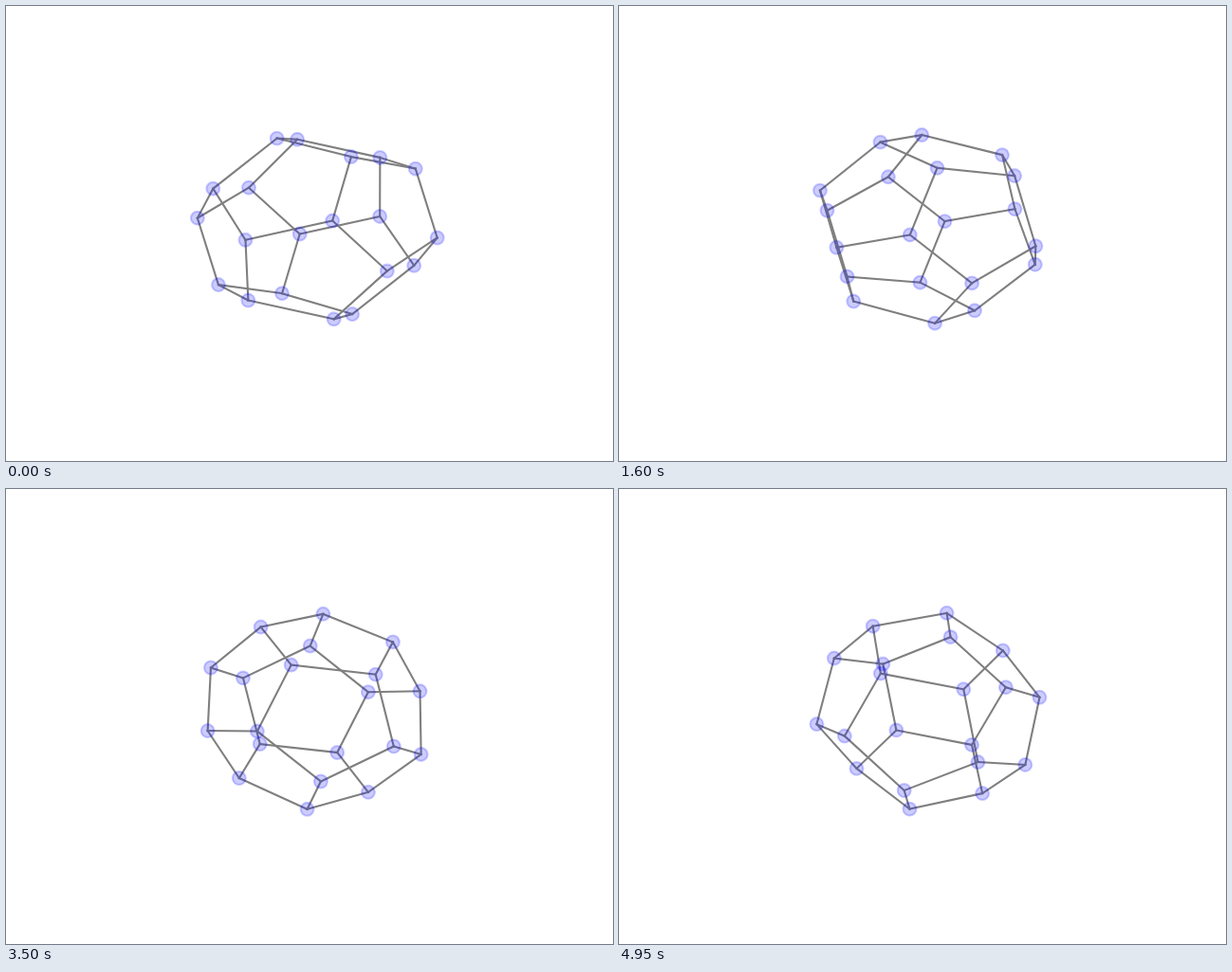
These frames come from a looping animation (640x480 px, 5000 ms). An HTML page with a canvas:

```html
<!DOCTYPE html>
<html lang="en">
<head>
<meta charset="utf-8">
<title>Rotating dodecahedron</title>
<style>
  html, body { margin: 0; width: 100%; height: 100%; overflow: hidden; background: #fff; }
  canvas { display: block; }
</style>
</head>
<body>
<canvas id="stage" width="640" height="480"></canvas>
<script>
const ctx = document.getElementById('stage').getContext('2d');
const STEP = 50, STEPS = 100;
const CENTER = [326.08, 233.92], EYE = 2432.4;
const PHI = (1 + Math.sqrt(5)) / 2;

// Maps the regular solid to the slightly sheared one in view space (pixels).
const SHAPE = [
  [26.09, -68.11, -0.05],
  [71.14, 16.55, -18.22],
  [15.70, 1.68, 57.92]
];

const dot = (a, b) => a[0] * b[0] + a[1] * b[1] + a[2] * b[2];

function dodecahedron() {
  const s = [-1, 1], v = [];
  for (const a of s) for (const b of s) {
    for (const c of s) v.push([a, b, c]);
    const p = a / PHI, q = b * PHI;
    v.push([0, p, q], [p, q, 0], [q, 0, p]);
  }
  return v;
}

const solid = dodecahedron();
const edges = [];
solid.forEach((a, i) => solid.forEach((b, j) => {
  if (i < j && Math.hypot(a[0] - b[0], a[1] - b[1], a[2] - b[2]) < 1.3) edges.push([i, j]);
}));
const points = solid.map(v => SHAPE.map(row => dot(row, v)));

function camera(elev, azim) {
  const se = Math.sin(elev), ce = Math.cos(elev);
  const sa = Math.sin(azim), ca = Math.cos(azim);
  const right = [-sa, ca, 0];
  const up = [-se * ca, -se * sa, ce];
  const toEye = [ce * ca, ce * sa, se];
  return p => {
    const k = EYE / (EYE - dot(toEye, p));
    return [CENTER[0] + k * dot(right, p), CENTER[1] - k * dot(up, p)];
  };
}

function draw(step) {
  const deg = Math.PI / 180;
  const pts = points.map(camera(step * 0.2 * deg, step * 0.5 * deg));
  ctx.fillStyle = '#fff';
  ctx.fillRect(0, 0, 640, 480);

  ctx.lineWidth = 2.083;
  ctx.lineCap = 'square';
  ctx.strokeStyle = '#7f7f7f';
  for (const [i, j] of edges) {
    ctx.beginPath();
    ctx.moveTo(...pts[i]);
    ctx.lineTo(...pts[j]);
    ctx.stroke();
  }

  ctx.fillStyle = ctx.strokeStyle = 'rgba(0, 0, 255, 0.2)';
  for (const [x, y] of pts) {
    ctx.beginPath();
    ctx.arc(x, y, 6.944, 0, 2 * Math.PI);
    ctx.fill();
    ctx.stroke();
  }
}

const start = performance.now();
function tick() {
  draw(Math.floor((performance.now() - start) / STEP) % STEPS);
  requestAnimationFrame(tick);
}
tick();
</script>
</body>
</html>
```
